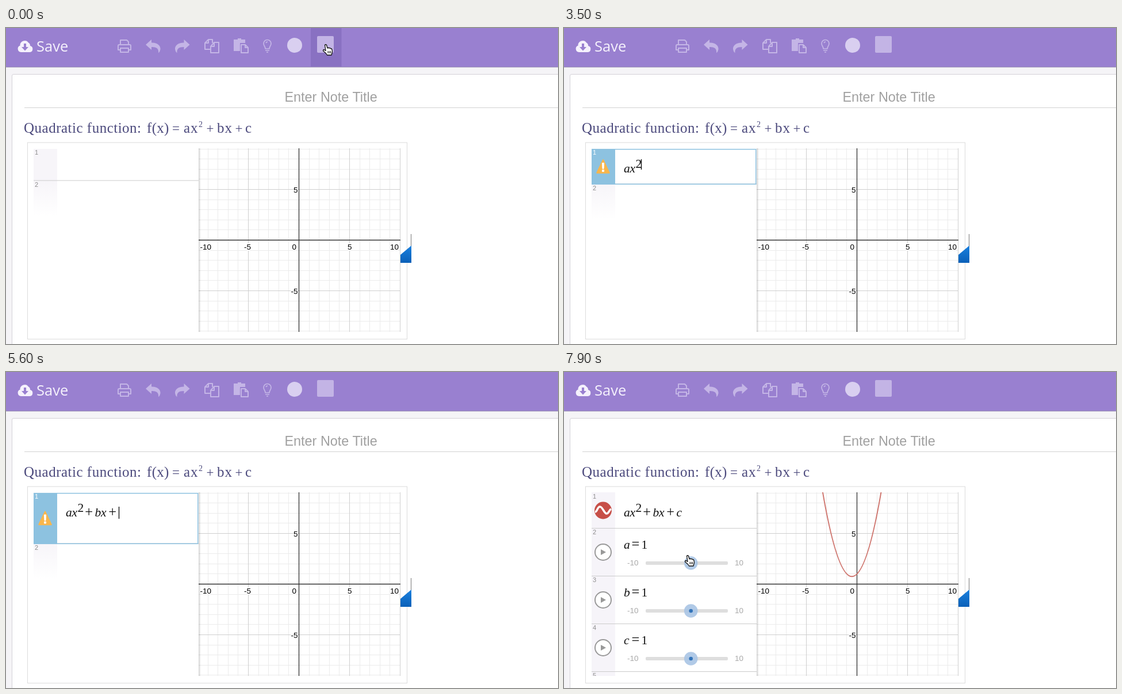
Write an HTML page that moves like this. It is 960 by 549 pixels and loops after 8000 ms.

```html
<!DOCTYPE html>
<html lang="en">
<head>
<meta charset="utf-8">
<title>Quadratic function note</title>
<style>
  html, body { margin: 0; width: 100%; height: 100%; overflow: hidden; background: #f5f4f7; }
  svg { display: block; width: 960px; height: 549px; }
  text { font-family: "Liberation Sans", Arial, sans-serif; }
  .save { font: 25.5px "Open Sans", sans-serif; fill: #f5f1fc; }
  .title { font-size: 23.4px; fill: #a0a0a0; }
  .heading text { font: 25px "Liberation Serif", Times, serif; fill: #4c4a7d; }
  .heading .op { font-size: 23px; }
  .math text { font: italic 21.5px "Liberation Serif", Times, serif; fill: #111; }
  .math .up { font-style: normal; }
  .math .op { font-style: normal; font-size: 24.5px; }
  .num { font-size: 11px; fill: #8c8c8c; }
  .tick { font-size: 13.5px; fill: #000; stroke: #fff; stroke-width: 3px; paint-order: stroke; }
  .limit { font-size: 13.5px; fill: #aaa; }
  .label { font-size: 13.8px; fill: #777; }
  .btn { font: italic 16px "Liberation Serif", Times, serif; fill: #fff; text-anchor: middle; }
  .btn.all { font-style: normal; }
  .icons { fill: none; stroke: #c4b5e6; stroke-width: 2; stroke-linejoin: round; }
  .icons .solid { fill: #c4b5e6; stroke: none; }
</style>
</head>
<body>
<svg viewBox="0 0 960 549">
  <defs>
    <linearGradient id="fade" x2="0" y2="1"><stop stop-color="#f7f5f9"/><stop offset="1" stop-color="#fff"/></linearGradient>
    <linearGradient id="blue" x2="0" y2="1"><stop stop-color="#1a80de"/><stop offset="1" stop-color="#0b60b8"/></linearGradient>
    <linearGradient id="gray" x2="0" y2="1"><stop stop-color="#c0c0c0"/><stop offset="1" stop-color="#a4a4a4"/></linearGradient>
    <linearGradient id="shade"><stop stop-color="#000" stop-opacity=".18"/><stop offset="1" stop-color="#000" stop-opacity="0"/></linearGradient>
    <clipPath id="panelClip"><path d="M48 209H335V528H48Z"/></clipPath>
    <clipPath id="graphClip"><path d="M335 209H686V528H335Z"/></clipPath>
  </defs>

  <!-- toolbar -->
  <rect width="960" height="549" fill="#f5f4f7"/>
  <rect width="960" height="67" fill="#9980d0"/>
  <path d="M0 67.500H960" stroke="#9382bd"/>
  <path d="M0 68.500H960" stroke="#cfcad9"/>
  <rect id="tile" x="530" width="53.500" height="67" fill="#8971c2"/>
  <path d="M26 42a6 6 0 0 1-1.500-11.600A8 8 0 0 1 39 25.500A6 6 0 0 1 42 31A5.600 5.600 0 0 1 41.500 42Z" fill="#f5f1fc"/>
  <path d="M31 27h4v6h4l-6 6.500-6-6.500h4Z" fill="#9980d0"/>
  <text class="save" x="53" y="41">Save</text>
  <g class="icons">
    <path d="M199 29V21H210L213 24V29M199 38H195V31Q195 29 197 29H215Q217 29 217 31V38H213M199 35H213V42H199Z"/>
    <path id="undo" class="solid" d="M243 29L253 20V25.500C264 25.500 269 31 268.500 37Q268 41 265 43.500C266 36 262 33 253 33V38Z"/>
    <use href="#undo" transform="matrix(-1 0 0 1 562.500 0)"/>
    <path d="M355 37H346V26L352 20H359V26M352 20V26H346M356 32L362 25H370V43H356ZM362 25V32H356"/>
    <path class="solid" d="M396 20H403V18H409V20H416V26H407V40H396Z"/>
    <path d="M409 29H416L421 34V43H409ZM416 29V34H421"/>
    <path d="M451 36C451 32 448 31 448 27A6.500 6.500 0 0 1 461 27C461 31 458 32 458 36ZM451 39H458M453 42H456M452 26Q453 24 455 24" stroke-width="1.700"/>
  </g>
  <circle cx="502" cy="30" r="13" fill="#d9cff0"/>
  <rect x="541" y="14" width="29" height="29" rx="2" fill="#c3b4e5"/>

  <!-- page -->
  <path d="M10.500 549V83Q10.500 80.500 13 80.500H961V549" fill="#fff" stroke="#d4d2d8"/>
  <text class="title" x="484.500" y="127.500">Enter Note Title</text>
  <path d="M32 138.500H960" stroke="#d2d2d2"/>
  <g class="heading">
    <text x="31" y="181.500" letter-spacing=".5">Quadratic function:</text>
    <text x="245" y="181.500" letter-spacing=".3">f(x)</text>
    <text class="op" x="289" y="181.500">=</text>
    <text x="309" y="181.500" letter-spacing="1">ax</text>
    <text x="335" y="172" style="font-size:14px">2</text>
    <text class="op" x="348.500" y="181.500">+</text>
    <text x="367" y="181.500" letter-spacing="1">bx</text>
    <text class="op" x="398.500" y="181.500">+</text>
    <text x="416" y="181.500">c</text>
  </g>
  <rect x="37.500" y="199" width="660" height="341.500" fill="#fff" stroke="#dcdcdc"/>

  <!-- graph -->
  <g clip-path="url(#graphClip)">
    <g id="grid"></g>
    <path id="curve" d="M439.100 139.700Q500.700 570.900 562.300 139.700" fill="none" stroke="#cf766f" stroke-width="2"/>
    <rect x="335" y="209" width="4" height="320" fill="url(#shade)"/>
  </g>
  <path d="M704.500 358V379" stroke="#777"/>
  <path d="M686 394L705 378V408H686Z" fill="url(#blue)"/>

  <!-- expression list -->
  <g clip-path="url(#panelClip)">
    <g id="editing">
      <rect x="48" y="210" width="41" height="55" fill="#f7f5f9"/>
      <g id="below">
        <rect x="48" width="41" height="62" fill="url(#fade)"/>
        <path d="M48 0H335" stroke="#cbcbcb"/>
        <text class="num" x="50" y="10.500">2</text>
      </g>
      <g id="active">
        <rect id="band" x="48" y="210" width="41" fill="#8dc2e0"/>
        <rect id="frame" x="48.700" y="210.700" width="285" fill="none" stroke="#8dc2e0" stroke-width="1.500"/>
      </g>
      <g id="warn">
        <path d="M0-11L10.500 11H-10.500Z" fill="#f8b64c" stroke="#f8b64c" stroke-width="2.500" stroke-linejoin="round"/>
        <path d="M-1.600-6H1.600L1 4H-1ZM-1.500 6H1.500V9H-1.500Z" fill="#fff" stroke="#fff"/>
      </g>
      <g id="sliders"></g>
    </g>
    <g id="rows"></g>
    <text class="num" id="first" x="50" y="220">1</text>
    <g id="formula" class="math"></g>
    <path id="caret" stroke="#111" stroke-width="1.400"/>
  </g>

  <!-- pointers -->
  <g id="hand">
    <path d="M3.500 1.500Q5 0 6.500 1.500L8 7Q9.500 5.500 11 7Q12.500 6 13.500 7.800Q15.500 7.500 16 9.500L16.500 13L15 19H7.500L5.500 16L.800 12Q0 10 2 9.500L5 11.500Z" fill="#fff" stroke="#111" stroke-width="1.300" stroke-linejoin="round"/>
    <path d="M9 12V16M11.300 12V16M13.500 12V16" stroke="#111"/>
  </g>
  <path id="arrow" d="M0 0V16L4 12.500L6.500 18L9 17L6.500 11.500H12Z" fill="#111" stroke="#fff"/>
  <path id="beam" d="M-4-8Q0-8 0-5.500Q0-8 4-8M0-6V6M-4 8Q0 8 0 5.500Q0 8 4 8M-2.500 2H2.500" fill="none" stroke="#111" stroke-width="1.400"/>
</svg>

<script>
const LOOP = 8000, STEP = 100;
const SELECT = 1000, OPEN = 7400;
const el = id => document.getElementById(id);
const show = (id, on) => el(id).style.display = on ? '' : 'none';
const ramp = (t, from, to) => Math.min(1, Math.max(0, (t - from) / (to - from)));
const latest = (list, t) => list.filter(e => e[0] <= t).pop();

// time, glyph, x, caret x after it, caret raised
const keys = [
  [SELECT, '', 0, 105, 0],
  [2000, 'a', 104, 115, 0],
  [2500, 'x', 114.5, 124, 0],
  [3100, '', 0, 126, 1],
  [3500, '2', 124.5, 135, 1],
  [3900, '', 0, 136, 0],
  [4100, '+', 137.3, 152, 0],
  [4500, 'b', 154.5, 167, 0],
  [5000, 'x', 165, 176, 0],
  [5500, '+', 178.2, 197, 0],
  [6000, 'c', 195.5, 206, 0]
];
// time, variables offered as sliders
const offers = [[0, ''], [2000, 'a'], [3100, ''], [3500, 'a'], [4100, ''], [4500, 'ab'], [5500, ''], [6000, 'abc']];
// time, x, y of the hot spot
const path = [[0, 556, 28], [100, 556, 28], [900, 254.5, 253.5], [6400, 254.5, 253.5],
  [6900, 296, 275], [7300, 296, 275], [7800, 215, 318], [LOOP, 215, 318]];

function drawGrid() {
  const X = 509.5, Y = 368.5, U = 17.6;
  const snap = v => Math.floor(v) + .5;
  const lines = (keep, color, width = 1) => {
    let d = '';
    for (let i = -10; i <= 10; i++) {
      if (keep(i)) d += `M${snap(X + i * U)} 209V529M335 ${snap(Y + i * U)}H686`;
    }
    return `<path d="${d}" stroke="${color}" stroke-width="${width}"/>`;
  };
  const tick = (x, y, s) => `<text class="tick" x="${x}" y="${y}">${s}</text>`;
  el('grid').innerHTML = lines(i => i % 5, '#ebebeb') + lines(i => i && i % 5 === 0, '#cfcfcf') +
    lines(i => i === 0, '#333', 1.3) +
    tick(337.5, 385, '-10') + tick(414, 385, '-5') + tick(497.5, 385, '0') + tick(594, 385, '5') +
    tick(668, 385, '10') + tick(500, 286, '5') + tick(495.5, 462, '-5');
}

function sliderRow(name, i) {
  const y = 271 + i * 83;
  return `<path d="M48 ${y + .5}H335" stroke="#cbcbcb"/>
    <text class="num" x="50" y="${y + 11}">${i + 2}</text>
    <circle cx="68" cy="${y + 42}" r="14" fill="#fff" stroke="#999" stroke-width="2"/>
    <path d="M64 ${y + 37}V${y + 47}L73 ${y + 42}Z" fill="#999"/>
    <g class="math"><text x="104" y="${y + 36}">${name}</text>
      <text class="op" x="117.500" y="${y + 36}">=</text><text class="up" x="134.500" y="${y + 36}">1</text></g>
    <text class="limit" x="110" y="${y + 65}">-10</text><text class="limit" x="297" y="${y + 65}">10</text>
    <rect x="142" y="${y + 58}" width="143" height="6" rx="2" fill="#dedede"/>
    <circle cx="220.700" cy="${y + 61}" r="11.800" fill="#a9c4e4" opacity=".9"/>
    <circle cx="220.700" cy="${y + 61}" r="3.300" fill="#3374ba"/>`;
}

function drawRows() {
  el('rows').innerHTML = `<rect x="48" y="209" width="287" height="320" fill="#fff"/>
    <rect x="48" y="209" width="41" height="320" fill="#f6f4f9"/>
    <circle cx="68" cy="240.500" r="15" fill="#c74f48"/>
    <path d="M54 243C58 243 58 234 62.500 234S70 246 74 246S78 240 82 238" fill="none" stroke="#fff" stroke-width="3.500"/>` +
    [...'abc'].map(sliderRow).join('') +
    `<path d="M48 520.500H335" stroke="#cbcbcb"/><text class="num" x="50" y="531">5</text>`;
}

function buttons(vars) {
  if (!vars) return '';
  const names = vars.length > 1 ? [...vars, 'all'] : [vars];
  return '<text class="label" x="104" y="284">add slider:</text>' + names.map((name, i) => {
    const x = 179 + i * 38.3, all = name === 'all', w = all ? 38 : 30.5;
    const [fill, edge] = all || names.length === 1 ? ['blue', '#1a6fc6'] : ['gray', '#a2a2a2'];
    return `<rect x="${x}" y="265.500" width="${w}" height="26.500" rx="4" fill="url(#${fill})" stroke="${edge}"/>
      <text class="btn ${all ? 'all' : ''}" x="${x + w / 2}" y="285">${name}</text>`;
  }).join('');
}

function drawFormula() {
  const style = { '2': 'up', '+': 'op' };
  el('formula').innerHTML = keys.map(([, ch, x, , raised]) =>
    `<text x="${x}" y="${raised ? 242.5 : 251}" class="${style[ch] || ''}">${ch}</text>`).join('');
}

function movePointer(t) {
  const n = path.findIndex(p => p[0] > t);
  const [t0, x0, y0] = path[n - 1], [t1, x1, y1] = path[n];
  const p = ramp(t, t0, t1), k = p * p * (3 - 2 * p);
  const x = x0 + (x1 - x0) * k, y = y0 + (y1 - y0) * k;
  const visible = t < 2000 || t >= 6400;
  const inList = x < 335 && y > 209;
  const kind = y < 67 || t >= 6800 ? 'hand' : inList ? 'beam' : 'arrow';
  for (const id of ['hand', 'arrow', 'beam']) show(id, visible && id === kind);
  el(kind).setAttribute('transform', `translate(${kind === 'hand' ? x - 5 : x} ${y})`);
  el('tile').style.opacity = 1 - ramp(t, 200, 500);
}

function render(t) {
  const open = t >= OPEN, selected = t >= SELECT && !open;
  const offer = latest(offers, t);
  const grow = ramp(t, offer[0] + 100, offer[0] + 300);
  const extra = t < 2000 ? 0 : 27 * (offer[1] ? grow : 1 - grow);
  const tall = t >= 3100;
  const h = (tall ? 61 : 55) + extra;

  show('editing', !open);
  show('rows', open);
  show('curve', open);
  show('active', selected);
  show('warn', t >= 2000);
  el('below').setAttribute('transform', `translate(0 ${210 + h})`);
  el('band').setAttribute('height', h);
  el('frame').setAttribute('height', h - .4);
  el('warn').setAttribute('transform', `translate(68 ${210 + h / 2})`);
  el('first').style.fill = selected ? '#fff' : '';

  el('sliders').innerHTML = buttons(offer[1]);
  el('sliders').style.opacity = ramp(t, offer[0], offer[0] + 200);
  el('sliders').setAttribute('transform', `translate(0 ${tall ? 0 : -6})`);

  el('formula').setAttribute('transform', `translate(0 ${tall ? 0 : -6})`);
  keys.forEach((key, i) => el('formula').children[i].style.display = t >= key[0] ? '' : 'none');

  const key = latest(keys, t);
  show('caret', selected && (t - key[0]) % 1000 < 500);
  if (key) {
    const top = key[4] ? 228 : tall ? 234 : 227;
    el('caret').setAttribute('d', `M${key[3] - .5} ${top}v${key[4] ? 18 : 21}`);
  }
  movePointer(t);
}

drawGrid();
drawRows();
drawFormula();
const start = performance.now();
function tick() {
  const t = (performance.now() - start) % LOOP;
  render(Math.floor(t / STEP) * STEP);
  requestAnimationFrame(tick);
}
tick();
</script>
</body>
</html>
```
